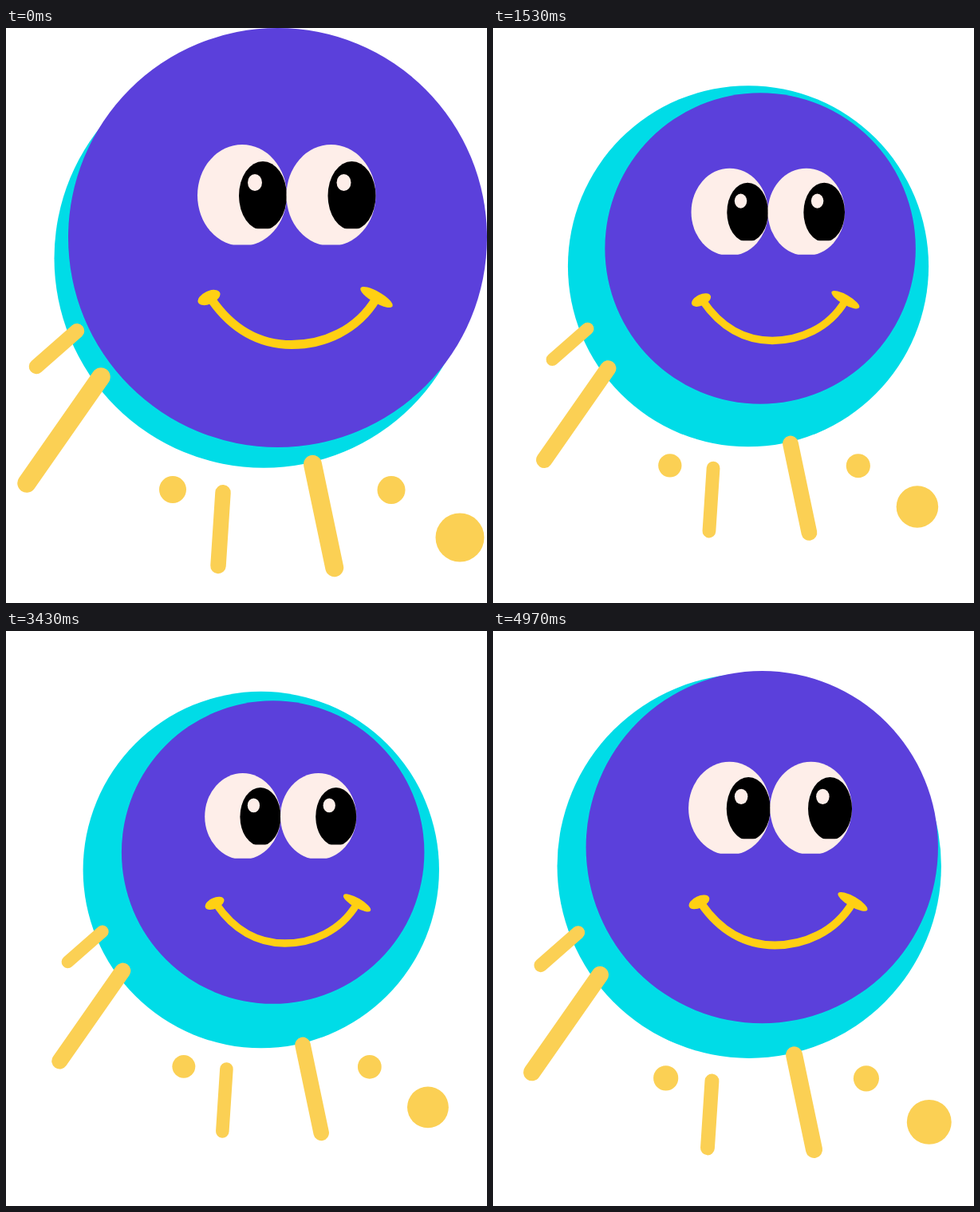
An HTML page that plays this animation: 603 px wide and 720 px high, repeating every 5.01 s.

```html
<!DOCTYPE html>
<html>
<head>
<meta charset="utf-8">
<title>Pulsing smiley</title>
<style>
  html, body { margin: 0; width: 100%; height: 100%; overflow: hidden; background: #fff; }
  svg { display: block; width: 603px; height: 720px; }
</style>
</head>
<body>
<svg viewBox="0 0 603 720">
  <defs>
    <clipPath id="whiteCut"><rect x="230" y="140" width="130" height="131.5"/></clipPath>
    <clipPath id="pupilCut"><rect x="285" y="160" width="75" height="91.2"/></clipPath>
    <g id="eye">
      <ellipse cx="296" cy="209.6" rx="56" ry="63.6" fill="#feeee9" clip-path="url(#whiteCut)"/>
      <ellipse cx="322" cy="210" rx="30" ry="43" clip-path="url(#pupilCut)"/>
      <ellipse cx="312" cy="193.5" rx="9" ry="10.5" fill="#feeee9"/>
    </g>
  </defs>
  <g id="scene">
    <circle cx="323" cy="288.3" r="262.5" fill="#00dce7"/>
    <circle id="head" cx="340.5" cy="262.5" r="262.5" fill="#5b40db"/>
    <use href="#eye"/>
    <use href="#eye" x="111.5"/>
    <g fill="#ffd013">
      <path d="M257 339C283 377 318 396.5 358 396.5S440 379 464 339" fill="none" stroke="#ffd013" stroke-width="11"/>
      <ellipse rx="15" ry="8" transform="translate(254.5 337.5) rotate(-25)"/>
      <ellipse rx="23" ry="7" transform="translate(464.5 337) rotate(30)"/>
    </g>
    <g stroke="#fbd054" stroke-linecap="round">
      <path d="M89 379.3L38 424" stroke-width="18.5"/>
      <path d="M119 437L26 570" stroke-width="23.5"/>
      <path d="M272 581.8L266 673.5" stroke-width="19.5"/>
      <path d="M384.5 546.3L411.7 675.7" stroke-width="23"/>
    </g>
    <g fill="#fbd054">
      <circle cx="209" cy="578" r="17"/>
      <circle cx="483" cy="578.5" r="17.5"/>
      <circle cx="569" cy="638" r="30.5"/>
    </g>
  </g>
</svg>
<script>
const LOOP = 5010, FRAMES = 150, FPS = 30, BEAT = 900;
const scene = document.getElementById('scene');
const head = document.getElementById('head');

// Each leg of the beat: start ms, end ms, scale from, scale to
const legs = [[0, 150, 1, 1.15], [150, 750, 1.15, 0.85], [750, 900, 0.85, 1]];
const easeOut = u => 1 - (1 - u) ** 2;

function beatScale(ms) {
  const [start, end, from, to] = legs.find(leg => ms < leg[1]);
  return from + (to - from) * easeOut((ms - start) / (end - start));
}

function draw(now) {
  // Motion steps at 30 pictures a second, with starts rounded to 10 ms
  const step = Math.min(FRAMES - 1, Math.floor((now % LOOP + 5) * FPS / 1000));
  const k = beatScale(step * 1000 / FPS % BEAT);
  scene.setAttribute('transform', `translate(301.5 360) scale(${k}) translate(-301.5 -360)`);
  head.setAttribute('r', 262.5 * k); // the head pulses once more within the scene
  requestAnimationFrame(draw);
}
draw(performance.now());
</script>
</body>
</html>
```
